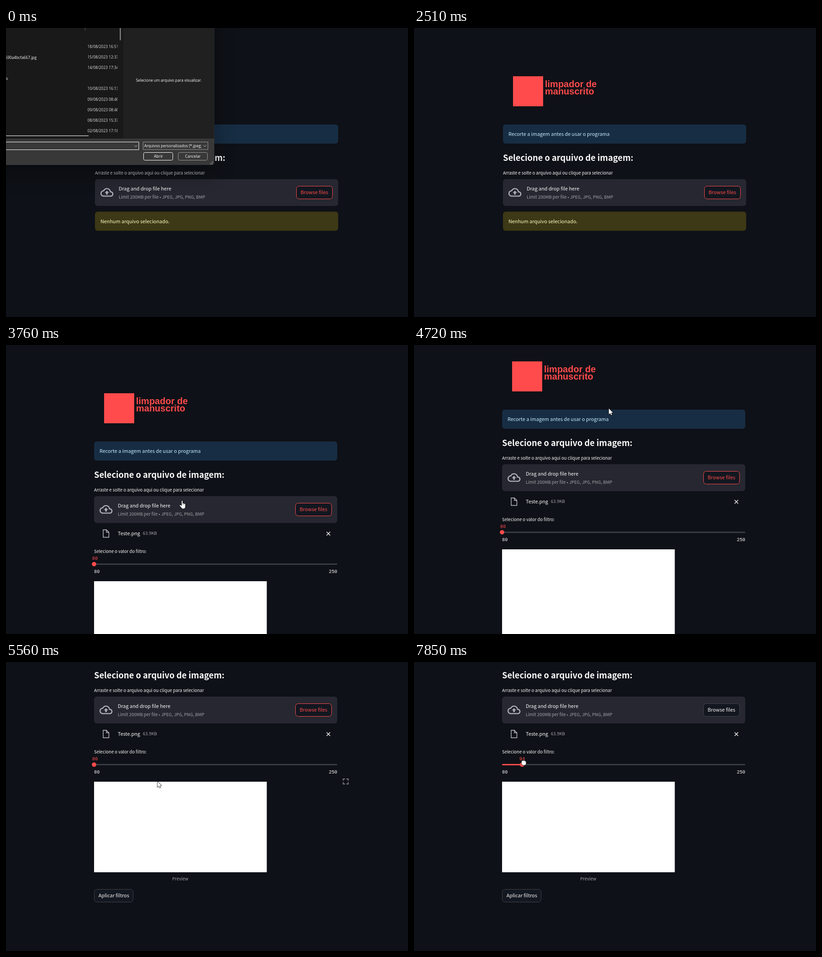
Recreate the animation shown at these times as an HTML page with a canvas. Size 881x635 px, loop 8000 ms.

```html
<!DOCTYPE html>
<html lang="pt-BR">
<head>
<meta charset="utf-8">
<style>
html, body { margin: 0; width: 100%; height: 100%; overflow: hidden; background: #0e1117; }
canvas { display: block; }
</style>
</head>
<body>
<canvas id="stage" width="881" height="635"></canvas>
<script>
const g = document.getElementById('stage').getContext('2d');
const LOOP = 8000;
const SANS = '"Noto Sans CJK JP", "Noto Sans CJK SC", "Noto Sans", sans-serif';
const UI = '"Open Sans", "Noto Sans", sans-serif';
const MONO = '"Liberation Mono", monospace';
const RED = '#ff4b4b', WHITE = '#fafafa', GREY = '#a3a3a8';

// Bursts of motion: first change, last change, number of changes
const BURSTS = [[140, 690, 5], [1110, 1380, 3], [1650, 1780, 2], [2210, 2210, 1], [2510, 3490, 8],
  [3610, 4420, 7], [4720, 5700, 8], [5850, 6720, 7], [7000, 7120, 2], [7400, 7850, 4]];

const POINTER = [[2510, -20, 200], [2650, 60, 230], [2790, 230, 285], [2930, 386, 342.5], [3745, 386, 342.5],
  [4420, 427, 139.5], [5140, 427, 139.5], [5700, 300, 303], [6720, 190, 226], [7260, 190, 226], [7850, 240, 221]];
const SCROLL = [[4580, 0], [5000, 211], [5140, 256]];
const VALUE = [[7260, 80], [7850, 94]];

const CLOUD = new Path2D('M19.35 10.04C18.67 6.59 15.64 4 12 4 9.11 4 6.6 5.64 5.35 8.04 2.34 8.36 0 10.91 0 14c0 3.31 2.69 6 6 6h13c2.76 0 5-2.24 5-5 0-2.64-2.05-4.78-4.65-4.96zM19 18H6c-2.21 0-4-1.79-4-4 0-2.05 1.53-3.76 3.56-3.97l1.07-.11.5-.95C8.08 7.14 9.94 6 12 6c2.62 0 4.88 1.86 5.39 4.43l.3 1.5 1.53.11c1.56.1 2.78 1.41 2.78 2.96 0 1.65-1.35 3-3 3zM8 13h2.55v3h2.9v-3H16l-4-4z');
const LINK = new Path2D('M-1-2.5h-3a2.5 2.5 0 0 0 0 5h3M1-2.5h3a2.5 2.5 0 0 1 0 5h-3M-2.5 0h5');

// Outline and finger lines
const CURSORS = {
  arrow: ['M0 0v13l3-3l2 4.5l2-1l-2-4h4z', ''],
  hand: ['M-1 0q1-1 2 0v6q1-1 2 0q1-1 2 .5q2-.5 2 1.5v4q0 4-3 5h-4q-2-3-5-6q-1-2 1-2l3 2z', 'M1 6v3M3 6.5v2.5M5 7v2'],
  open: ['M-2-5q1-2 2 0q1-2 2 0q2-1 2 1.5q2-.5 2 1.5v3q0 4-2 6h-6q-2-3-4-6q-1-2 1-1.5l1 1v-4.5q0-2 2-1z', 'M-2-4v4M0-5v5M2-5v5M4-3v3.5'],
  closed: ['M-4-3q1-2 3-1q1-1.5 3 0q2-.5 2 1q1.5 0 1.5 2v2q0 3-2 4.5h-6q-1-2-2-4q0-1.5 .5-2z', 'M-1-3.5v2M2-3.5v2M4-2.5v2']
};

// Holds the picture between changes
function snap(t) {
  let held = 0;
  for (const [from, to, n] of BURSTS) {
    if (t < from) break;
    const step = n > 1 ? (to - from) / (n - 1) : 1;
    held = from + Math.min(n - 1, Math.floor((t - from) / step + 1e-6)) * step;
  }
  return Math.round(held);
}

// Linear value of one column of a key list
function at(keys, t, col = 1) {
  if (t <= keys[0][0]) return keys[0][col];
  for (let i = 1; i < keys.length; i++) {
    const a = keys[i - 1], b = keys[i];
    if (t <= b[0]) return a[col] + (b[col] - a[col]) * (t - a[0]) / (b[0] - a[0]);
  }
  return keys[keys.length - 1][col];
}

// y is the middle of the capitals
function text(s, x, y, size, color = WHITE, family = SANS, align = 'left', weight = 400) {
  g.font = `${weight} ${size}px ${family}`;
  g.fillStyle = color;
  g.textAlign = align;
  g.fillText(s, x, Math.round(y + size * 0.365));
}

function box(x, y, w, h, r, fill, stroke) {
  g.beginPath();
  g.roundRect(x, y, w, h, r);
  if (fill) { g.fillStyle = fill; g.fill(); }
  if (stroke) { g.strokeStyle = stroke; g.lineWidth = 1; g.stroke(); }
}

function line(d, color, width = 1) {
  g.strokeStyle = color;
  g.lineWidth = width;
  g.stroke(typeof d === 'string' ? new Path2D(d) : d);
}

function clipped(x, y, w, h, draw) {
  g.save();
  g.beginPath();
  g.rect(x, y, w, h);
  g.clip();
  draw();
  g.restore();
}

function notice(y, fill, color, s) {
  box(195, y, 533, 42, 6, fill);
  text(s, 207, y + 21.5, 10.85, color);
}

function expandIcon(y) {
  line(`M741 ${y + 4}v-4h4m3 0h4v4m0 3v4h-4m-3 0h-4v-4`, GREY, 1.3);
}

function slider(v) {
  const x = 195 + 533 * (v - 80) / 170;
  text('Selecione o valor do filtro:', 195, 453.5, 9.5);
  box(195, 480, 533, 3, 1.5, '#3a3b43');
  box(195, 480, x - 195, 3, 1.5, RED);
  g.beginPath();
  g.arc(x, 481.5, 4.8, 0, 7);
  g.fillStyle = RED;
  g.fill();
  text(Math.round(v), Math.max(x, 197), 468, 10.3, RED, MONO, 'center');
  text('80', 195, 497.5, 10.3, WHITE, MONO);
  text('250', 728, 497.5, 10.3, WHITE, MONO, 'right');
}

function fileRow(t) {
  line('M215 406h7l5.5 5.5v11h-12.5zM222 406v5.5h5.5', '#c3c3c9', 1.4);
  line('M704.5 410.5l8 8m0-8l-8 8', WHITE, 1.4);
  if (t < 3190) {
    text('Teste.…', 247, 414, 10.85);
    box(297, 411.5, 404, 6, 3, '#262730');
    box(297, 411.5, 404 * (t < 2930 ? 0.45 : 0.965), 6, 3, '#1c83e1');
  } else {
    text('Teste.png', 247, 414, 10.85);
    text('63.9KB', 302, 414, 9.5, GREY);
  }
}

function page(t, scroll, px, py) {
  const dialogOpen = t < 2510, loaded = t >= 3610;
  box(217, 106, 66, 66, 0, RED);
  text('limpador de', 287, 123, 20, RED, '"Liberation Sans", Arial, sans-serif', 'left', 700);
  text('manuscrito', 287, 138.5, 20, RED, '"Liberation Sans", Arial, sans-serif', 'left', 700);
  notice(212, '#172d43', '#c7ebff', 'Recorte a imagem antes de usar o programa');

  if (t >= 2790 && t < 3190) {
    g.beginPath();
    g.arc(174, 285, 14.5, 0, 7);
    g.fillStyle = '#161a21';
    g.fill();
    g.save();
    g.translate(174, 285);
    g.rotate(-Math.PI / 4);
    line(LINK, '#a9abb0', 1.2);
    g.restore();
  }
  text('Selecione o arquivo de imagem:', 195, 285, 18.27, WHITE, SANS, 'left', 700);
  text('Arraste e solte o arquivo aqui ou clique para selecionar', 195, 319, 9.5, dialogOpen ? '#cfd0d4' : WHITE);

  box(195, 332, 533, 59, 6, '#262730');
  g.save();
  g.translate(207, 347);
  g.scale(1.18, 1.18);
  g.fillStyle = '#b2b1bf';
  g.fill(CLOUD, 'evenodd');
  g.restore();
  text('Drag and drop file here', 247, 353, 10.85);
  text('Limit 200MB per file • JPEG, JPG, PNG, BMP', 247, 371.5, 9.5, GREY);
  const focus = t < 7400;
  box(636.5, 347.5, 79, 28, 6, '#131720', focus ? RED : '#414349');
  text('Browse files', 675.8, 361, 10.85, focus ? RED : WHITE, SANS, 'center');

  if (t >= 2790) fileRow(t);
  if (t < 3490) {
    notice(t < 2790 ? 403.5 : 444.5, '#3d3815', '#ffffc2', 'Nenhum arquivo selecionado.');
    return;
  }
  slider(at(VALUE, t));
  if (loaded) box(195, 519, 378.5, 199, 0, '#fff');
  text('Preview', 384, loaded ? 733 : 526, 9.5, GREY, SANS, 'center');
  const y = loaded ? 755.5 : 548.5;
  box(195.5, y, 85, 28, 6, '#131720', '#414349');
  text('Aplicar filtros', 238.3, y + 14, 10.85, WHITE, SANS, 'center');

  const over = py + scroll;
  if (px > 193 && over > 78 && over < 195) expandIcon(80);
  if (px > 193 && over > 518) expandIcon(513);
}

function row(y, date, x, kind) {
  text(date, x, y, 8.4, '#dedede', UI);
  if (kind) text(kind, 181, y, 8.4, '#dedede', UI);
}

function hover(y, color) {
  box(0, y - 9.5, 244, 19, 0, color);
}

function recentFiles() {
  ['18/08/2023 16:51', '15/08/2023 12:37', '14/08/2023 17:34', '', '10/08/2023 16:13', '09/08/2023 08:46',
    '09/08/2023 08:46', '08/08/2023 15:37', '02/08/2023 17:18'].forEach((d, i) => row(41 + 23.1 * i, d, 178.5));
  text('690a4bcfa667.jpg', 67, 65, 8.4, '#fff', UI, 'right');
  text('s', 0, 111, 8.4, '#fff', UI);
}

function folders(t) {
  if (t < 1110) hover(137.5, '#4d4d4d');
  else if (t < 1240) hover(161, '#4d4d4d');
  else hover(184.5, '#777');
  if (t >= 1380) hover(208, '#4d4d4d');
  ['28/06/2023 08:25', '09/08/2023 10:40', '19/07/2023 11:28', '18/08/2023 16:50', '17/07/2023 16:13',
    '13/07/2023 14:15', '26/06/2023 11:18', '22/06/2023 11:55', '26/06/2023 16:47', '06/07/2023 10:55']
    .forEach((d, i) => row(20 + 23.5 * i, d, 72, 'Pasta de arquivos'));
  text('site', 13, 137.5, 8.4, '#fff', UI, 'right');
}

function images(t) {
  if (t >= 2210) hover(196.5, '#4d4d4d');
  for (let i = 0; i < 9; i++) row(8.5 + 23.5 * i, `22/06/2023 11:${54 - 3 * i}`, 72, 'Arquivo PNG');
}

function dialog(t) {
  const start = t < 140;
  g.save();
  g.shadowColor = 'rgba(0,0,0,.33)';
  g.shadowBlur = 45;
  g.shadowOffsetY = 18;
  box(-200, -200, 656.5, 501, 6, '#383838');
  g.restore();
  box(0, 0, 257, 243, 0, '#191919');
  box(257, 0, 199, 243, 0, '#202020');

  clipped(0, 0, 244.5, 230.5, () => {
    if (start) {
      line('M173.5 0v5', '#636363');
      recentFiles();
      return;
    }
    line('M67.5 0v5M176.5 0v5', '#636363');
    text('Data de modificação', 72, -4, 8.4, '#dedede', UI);
    text('Tipo', 181, -4, 8.4, '#dedede', UI);
    if (t >= 270 && t < 1650) folders(t);
    if (t >= 1780) images(t);
  });
  if (t < 1650) box(249.5, 0, 2, start ? 27 : 107, 1, '#9a9a9a');
  box(0, 236, start ? 181 : 161, 1.6, 0, '#c4c4c4');
  text(start ? 'Selecione um arquivo para visualizar.' : 'Nenhuma visualização disponível.',
    357, 115, 8.4, '#fff', UI, 'center');

  box(-9.5, 250.5, 300.5, 17, 0, '#383838', start ? '#fff' : '#9b9b9b');
  box(300.5, 250.5, 142, 16.5, 0, '#383838', '#9b9b9b');
  line('M281.5 258l3 3l3-3M433 257.5l3 3l3-3', '#d5d5d5');
  clipped(301, 250, 127, 18, () => text('Arquivos personalizados (*.jpeg;*.jpg)', 303, 259, 8.4, '#fff', UI));
  box(301.5, 273.5, 64, 17, 3, '#383838', '#fff');
  box(377.5, 273.5, 64, 17, 3, '#383838', '#9b9b9b');
  text('Abrir', 334, 282, 8.4, '#fff', UI, 'center');
  text('Cancelar', 409.5, 282, 8.4, '#fff', UI, 'center');
  for (let i = 0; i < 3; i++)
    for (let j = 0; j <= i; j++) box(452 - 2.5 * j, 293 + 2.5 * i, 1.2, 1.2, 0, '#b8b8b8');
}

function pointer(t, x, y, scroll) {
  const docY = y + scroll;
  let kind = 'arrow';
  if (x > 193 && x < 728 && docY > 332 && docY < 391) kind = 'hand';
  if (t >= 6500) kind = 'open';
  if (t >= 7000) kind = 'closed';
  const [outline, fingers] = CURSORS[kind];
  g.save();
  g.translate(x, y);
  g.lineJoin = 'round';
  line(outline, '#000', 1.4);
  g.fillStyle = '#fff';
  g.fill(new Path2D(outline));
  line(fingers, '#444', 0.6);
  g.restore();
}

function frame(now) {
  const t = snap(now % LOOP);
  const scroll = Math.round(at(SCROLL, t)), x = at(POINTER, t, 1), y = at(POINTER, t, 2);
  g.fillStyle = '#0e1117';
  g.fillRect(0, 0, 881, 635);
  clipped(0, 10, 881, 625, () => {
    g.translate(t >= 3610 ? -2 : 0, -scroll);
    page(t, scroll, x, y);
  });
  if (t < 2510) dialog(t);
  else pointer(t, x, y, scroll);
  requestAnimationFrame(frame);
}
requestAnimationFrame(frame);
</script>
</body>
</html>
```
